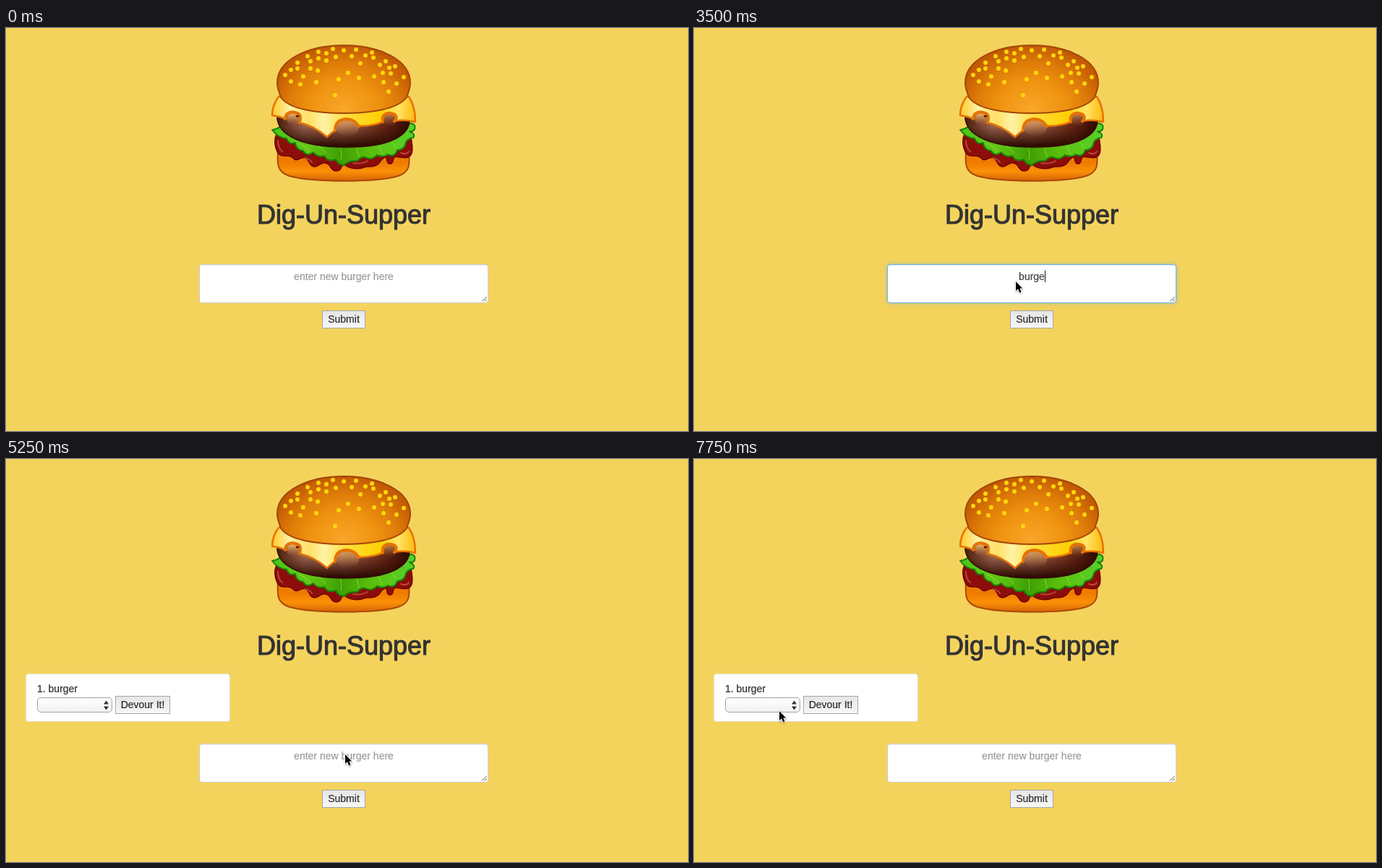
Animation of 943x558 px, one loop 8000 ms. Source, as an HTML page:

```html
<!DOCTYPE html>
<html lang="en">
<head>
<meta charset="utf-8">
<title>Burger list</title>
<style>
html, body { margin: 0; width: 100%; height: 100%; overflow: hidden; }
body { position: relative; background: #f4d35d; color: #2b2b2b; font: 14px/20px "Liberation Sans", Arial, sans-serif; -webkit-text-stroke: .2px; }
body *, .typed::before { box-sizing: border-box; }
div, svg { position: absolute; }
.art { left: 0; top: 0; }
.title { left: 0; top: 239px; width: 934px; text-align: center; font-size: 36px; line-height: 40px; color: #333; -webkit-text-stroke: 1.1px; }
.button { height: 25px; border: 1px solid #a6a6a6; background: linear-gradient(#e6e6e6, #f7f7f7); line-height: 22px; text-align: center; white-space: nowrap; }

.card { left: 27px; top: 297px; width: 283px; height: 67px; background: #fff; border: 1px solid #e6dcb8; border-radius: 4px; visibility: hidden; }
.item { left: 15px; top: 10px; }
.select { left: 15px; top: 32px; width: 104px; height: 21px; border: 1px solid #a2a2a2; border-radius: 5px; background: linear-gradient(#fff, #f1f1f1); }
.select svg { right: 3px; top: 3px; }
.devour { left: 123px; top: 30px; width: 76px; }

.form { left: 0; top: 0; width: 943px; height: 0; }
.field { left: 267px; top: 327px; width: 400px; height: 54px; border: 1px solid #ccc; border-radius: 4px; background: #fff; box-shadow: inset 0 1px 1px rgba(0,0,0,.075); text-align: center; }
.placeholder, .typed { left: 0; top: 6px; width: 398px; }
.placeholder { color: #999; }
.typed { color: #444; }
.typed::before { content: ""; }
.caret { display: inline-block; position: relative; width: 0; height: 16px; vertical-align: -3px; opacity: 0; }
.caret::after { content: ""; position: absolute; left: 0; top: 0; width: 1px; height: 16px; background: #111; }
.grip { right: 0; bottom: 0; }
.submit { left: 437px; top: 391px; width: 60px; }
.pointer { left: 0; top: 0; overflow: visible; opacity: 0; filter: drop-shadow(0 1px 1px rgba(0,0,0,.3)); }

.card, .form, .field, .placeholder, .typed::before, .caret, .pointer { animation: 8s step-end infinite; }
.card { animation-name: added; }
.form { animation-name: drop; }
.field { animation-name: focus; }
.placeholder { animation-name: hint; }
.typed::before { animation-name: type; }
.caret { animation-name: blink; }
.pointer { animation-name: point; }

@keyframes added { 65.625%, 100% { visibility: visible; } }
@keyframes drop { 0% { transform: none; } 65.625%, 100% { transform: translateY(67px); } }
@keyframes focus {
  25% { border-color: #66afe9; box-shadow: inset 0 1px 1px rgba(0,0,0,.075), 0 0 6px rgba(102,175,233,.5); }
  62.5%, 100% { border-color: #ccc; box-shadow: inset 0 1px 1px rgba(0,0,0,.075); }
}
@keyframes hint { 0%, 65.625%, 100% { opacity: 1; } 37.5% { opacity: 0; } }
@keyframes type {
  0%, 65.625%, 100% { content: ""; }
  37.5% { content: "b"; }
  40.625% { content: "bur"; }
  43.75% { content: "burge"; }
  46.875% { content: "burger"; }
}
@keyframes blink {
  0%, 28.125%, 53.125%, 62.5%, 100% { opacity: 0; }
  25%, 34.375%, 59.375% { opacity: 1; }
}
@keyframes point {
  0% { opacity: 0; transform: translate(723px, 124px); }
  3.125% { opacity: 1; transform: translate(723px, 124px); }
  6.25% { opacity: 1; transform: translate(437px, 324px); }
  9.375% { opacity: 1; transform: translate(444px, 342px); }
  12.5% { opacity: 1; transform: translate(446px, 351px); }
  28.125% { opacity: 1; transform: translate(445px, 351px); }
  53.125% { opacity: 1; transform: translate(447px, 381px); }
  56.25% { opacity: 1; transform: translate(465px, 407px); }
  59.375% { opacity: 1; transform: translate(469px, 409px); }
  71.875% { opacity: 1; transform: translate(474px, 410px); }
  75% { opacity: 1; transform: translate(486px, 409px); }
  78.125% { opacity: 1; transform: translate(344px, 402px); }
  81.25% { opacity: 1; transform: translate(228px, 399px); }
  87.5% { opacity: 1; transform: translate(183px, 391px); }
  90.625% { opacity: 1; transform: translate(136px, 381px); }
  93.75% { opacity: 1; transform: translate(117px, 361px); }
  96.875%, 100% { opacity: 1; transform: translate(118px, 349px); }
}
</style>
</head>
<body>
<svg class="art" width="943" height="230" stroke-linejoin="round" stroke-linecap="round">
  <defs>
    <radialGradient id="crown" gradientUnits="userSpaceOnUse" cx="467" cy="112" r="104" gradientTransform="matrix(1 0 0 .85 0 17)">
      <stop offset="0" stop-color="#f9a62a"/><stop offset=".45" stop-color="#ef920f"/><stop offset=".75" stop-color="#dc7a08"/><stop offset="1" stop-color="#c35a04"/>
    </radialGradient>
    <linearGradient id="heel" x2="0" y2="1">
      <stop offset=".4" stop-color="#ee7a00"/><stop offset=".7" stop-color="#fb9008"/><stop offset="1" stop-color="#d66204"/>
    </linearGradient>
    <linearGradient id="cheese">
      <stop offset="0" stop-color="#ffc928"/><stop offset=".12" stop-color="#fff0a4"/><stop offset=".26" stop-color="#ffe067"/>
      <stop offset=".36" stop-color="#fff3a8"/><stop offset=".5" stop-color="#ffdf45"/><stop offset=".75" stop-color="#ffd000"/>
      <stop offset=".88" stop-color="#ffe566"/><stop offset="1" stop-color="#ffb90a"/>
    </linearGradient>
    <linearGradient id="patty">
      <stop offset="0" stop-color="#4b1d0b"/><stop offset=".2" stop-color="#96604a"/><stop offset=".5" stop-color="#96604a"/>
      <stop offset=".78" stop-color="#6b2a18"/><stop offset="1" stop-color="#2f0800"/>
    </linearGradient>
    <linearGradient id="char" x2="0" y2="1">
      <stop offset=".4" stop-color="#2b0800" stop-opacity="0"/><stop offset=".95" stop-color="#2b0800" stop-opacity=".95"/>
    </linearGradient>
    <linearGradient id="leaf">
      <stop offset="0" stop-color="#4cc41c"/><stop offset=".25" stop-color="#62c814"/><stop offset=".48" stop-color="#3f9f04"/>
      <stop offset=".7" stop-color="#5cc00d"/><stop offset="1" stop-color="#58d02a"/>
    </linearGradient>
    <linearGradient id="hole" x2="0" y2="1">
      <stop offset=".2" stop-color="#dda25c"/><stop offset="1" stop-color="#b8754a" stop-opacity="0"/>
    </linearGradient>
  </defs>
  <path d="M376 168C375 188 374 199 392 205C425 214 512 214 542 205C560 199 558 188 557 168Z" fill="url(#heel)" stroke="#a84a08" stroke-width="2"/>
  <path d="M374 147C370 155 372 168 377 174C383 181 390 173 397 180C402 187 408 177 414 180C420 182 419 192 427 192C434 191 436 185 442 187C450 188 448 198 457 198C466 198 461 189 468 189C476 196 488 196 498 192C506 192 514 192 518 184C524 177 526 178 527 184C528 190 535 189 535 183C537 173 545 182 556 179C564 176 562 163 560 152Z" fill="#8c0d0a" stroke="#6a0202" stroke-width="1.5"/>
  <path d="M376 156q0 10 6 15M413 180q8 2 10 6M480 187q11 2 20-3M546 173q8 3 11-2" fill="none" stroke="#c65a48" stroke-width="2" opacity=".75"/>
  <path d="M368 141Q376 140 381 135L560 132Q567 133 565 140Q563 144 558 143Q567 147 563 152Q553 153 552 162Q549 169 541 169Q537 180 528 175Q521 180 513 176Q506 184 497 179Q490 178 486 184Q474 183 467 190Q459 189 456 182Q445 186 440 177Q431 180 425 172Q416 179 411 170Q401 169 400 159Q391 162 388 153Q376 152 368 141Z" fill="url(#leaf)" stroke="#15820b" stroke-width="2"/>
  <path d="M405 160q9 3 15 11M432 164q7 2 10 9M462 166q3 7 1 16M485 165l3 13M515 163l6 11M534 158l6 9" fill="none" stroke="#a1e44c" opacity=".65"/>
  <g id="meat">
    <path d="M375 117C373 134 382 146 401 154C431 168 505 169 535 155C553 147 560 137 558 119Z" fill="url(#patty)"/>
    <path d="M375 117C373 134 382 146 401 154C431 168 505 169 535 155C553 147 560 137 558 119Z" fill="url(#char)" stroke="#330a00" stroke-width="1.5"/>
  </g>
  <g fill="url(#hole)">
    <ellipse cx="398" cy="126" rx="10" ry="9"/><ellipse cx="472" cy="138" rx="16" ry="12" opacity=".75"/><ellipse cx="531" cy="127" rx="10" ry="9" opacity=".6"/>
  </g>
  <path d="M377 95C371 103 368 111 368 121Q378 122 386 126C386 118 393 115 400 117C408 119 408 123 406 131Q427 136 444 151Q451 144 455 142C455 130 462 126 472 126C481 127 484 131 488 136Q506 136 521 130C519 121 525 117 532 118C540 119 542 124 537 129Q550 126 566 130C566 116 563 104 557 95Z" fill="url(#cheese)" stroke="#e67205" stroke-width="2.5"/>
  <path d="M386 126C386 118 393 115 400 117C408 119 408 123 406 131M455 142C455 130 462 126 472 126C481 127 484 131 488 136M521 130C519 121 525 117 532 118C540 119 542 124 537 129" fill="none" stroke="#e67205" stroke-width="4"/>
  <ellipse cx="403" cy="122" rx="2.5" ry="1.5" fill="#422015"/>
  <path d="M375 76C375 45 416 24 467 24C518 24 559 45 559 76C559 84 556 89 554 96C542 112 506 118 467 118C428 118 391 112 380 96C378 89 375 84 375 76Z" fill="url(#crown)" stroke="#a24708" stroke-width="2"/>
  <g id="seeds" fill="#ffd60b"></g>
</svg>

<div class="title">Dig-Un-Supper</div>

<div class="card">
  <div class="item">1. burger</div>
  <div class="select"><svg width="9" height="14" fill="#333"><path d="M1 5.5 4.5 .5 8 5.5ZM1 8.5 4.5 13.5 8 8.5Z"/></svg></div>
  <div class="button devour">Devour It!</div>
</div>

<div class="form">
  <div class="field">
    <div class="placeholder">enter new burger here</div>
    <div class="typed"><span class="caret"></span></div>
    <svg class="grip" width="10" height="10" stroke="#555"><path d="M2 8.5 8.5 2M5.5 8.5 8.5 5.5"/></svg>
  </div>
  <div class="button submit">Submit</div>
</div>

<svg class="pointer" width="12" height="18"><path d="M0 0V13L3 10.3 5.2 15.5 7.6 14.5 5.4 9.4H9.2Z" fill="#000" stroke="#fff" stroke-width="2" paint-order="stroke"/></svg>

<script>
const seeds = [
  [386, 65], [394, 58], [403, 48], [403, 56], [411, 67], [394, 74], [407, 78], [417, 39], [421, 46], [421, 56], [431, 59],
  [432, 33], [432, 42], [443, 35], [443, 45], [452, 29], [456, 40], [429, 75], [467, 31], [484, 30], [478, 39], [497, 38],
  [490, 49], [473, 62], [460, 71], [488, 69], [509, 67], [506, 34], [508, 41], [517, 51], [525, 46], [530, 55], [538, 53],
  [521, 62], [532, 63], [550, 68], [540, 77], [522, 75], [529, 88], [455, 93]
];
document.getElementById("seeds").innerHTML = seeds.map(([x, y]) => `<circle cx="${x}" cy="${y}" r="3"/>`).join("");
</script>
</body>
</html>
```
